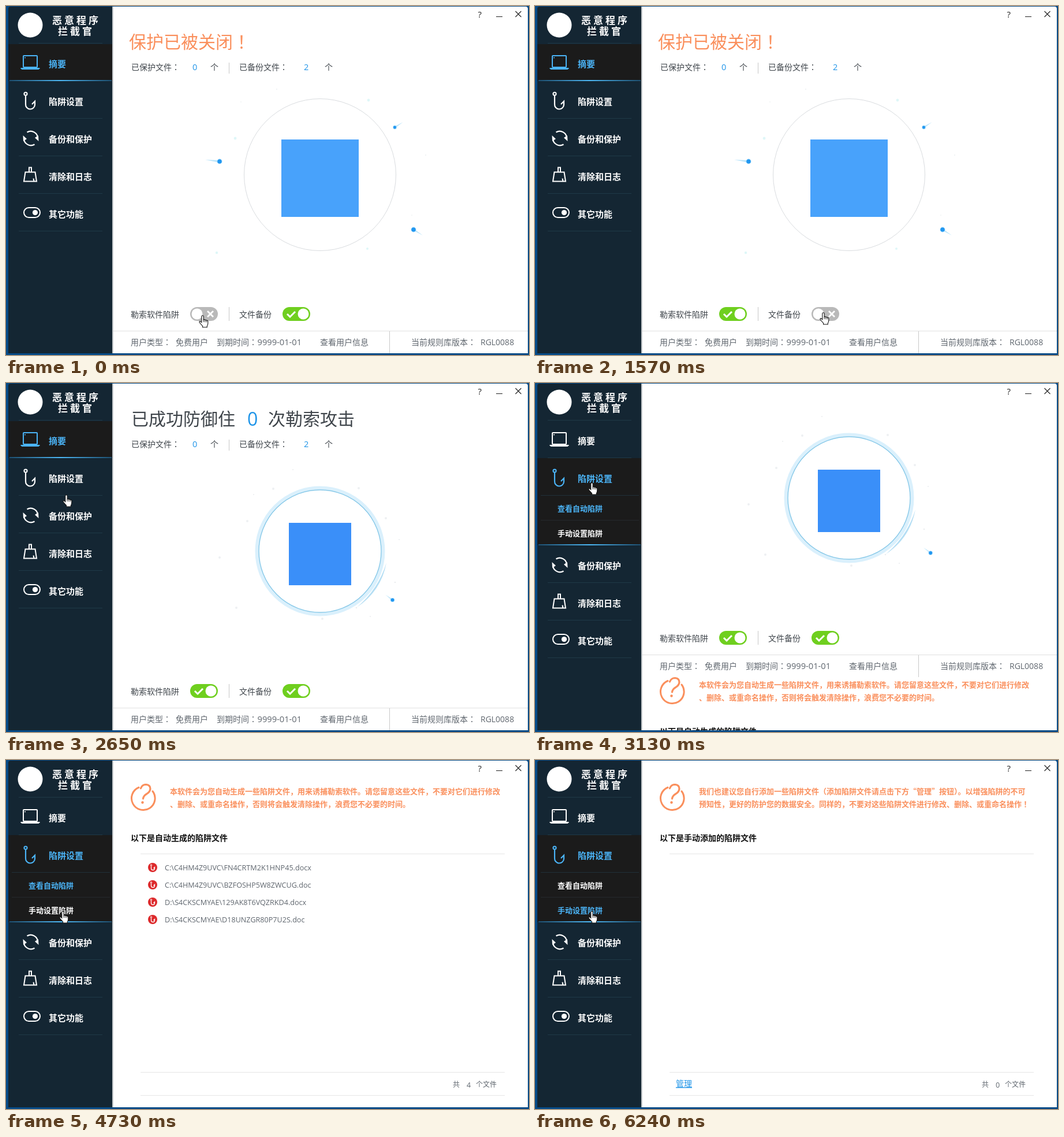
An HTML page that plays this animation: 906x604 px, repeating every 8000 ms.

```html
<!DOCTYPE html>
<html lang="zh-CN">
<head>
<meta charset="utf-8">
<style>
html, body { margin: 0; width: 100%; height: 100%; overflow: hidden; background: #064a86; }
svg { display: block; width: 906px; height: 604px; }
text { font-family: "Noto Sans CJK SC", "Noto Sans CJK", "Open Sans", sans-serif; white-space: pre; }
.mid { font-family: "Noto Sans CJK TC", "Noto Sans CJK", sans-serif; }
.lat { font-family: "Open Sans", "Noto Sans", sans-serif; }
.b { font-weight: 700; }
.thin { font-weight: 300; }
</style>
</head>
<body>
<svg id="stage" viewBox="0 0 906 604" lang="zh-CN"></svg>
<script>
const LOOP = 8000;
const BLUE = '#1e94e8', SKY = '#4bb4f7', ORANGE = '#fa8f5c', DARK = '#3f454b', GREY = '#5f666e';

// Colons and exclamation marks sit in the middle of their square
const centred = str => str.replace(/[：！]/g, '<tspan class="mid" lang="zh-TW">$&</tspan>');
// y is the middle of the glyphs
const text = (x, y, size, str, fill, attrs = '') =>
  `<text x="${x}" y="${(y + size * 0.37).toFixed(1)}" font-size="${size}" fill="${fill}" ${attrs}>${centred(String(str))}</text>`;
const rect = (x, y, w, h, fill, attrs = '') =>
  `<rect x="${x}" y="${y}" width="${w}" height="${h}" fill="${fill}" ${attrs}/>`;
const dot = (x, y, r, fill, attrs = '') => `<circle cx="${x}" cy="${y}" r="${r}" fill="${fill}" ${attrs}/>`;
const line = (d, stroke, width = 1, attrs = '') =>
  `<path d="${d}" fill="none" stroke="${stroke}" stroke-width="${width}" ${attrs}/>`;
const group = (id, body, attrs = '') => `<g id="${id}" ${attrs}>${body}</g>`;
const LAT = 'class="lat"', BOLD = 'class="b"', THIN = 'class="thin"';

// Menu icons, drawn around the middle line of their row
const icons = [
  c => rect(30, -14, 24, 20, 'none', `rx="1" stroke="${c}" stroke-width="2"`) +
    line('M25.5 8H58.5', c, 2) + line('M27 9.5H57', c, 1) + line('M32 -10.5h2', c, 1.5),
  c => dot(34, -13, 2.6, 'none', `stroke="${c}" stroke-width="2"`) +
    line('M34 -10V5a8 8 0 0 0 16 1V0l-5 5', c, 2.2),
  c => line('M36.5 -11.5A12.2 12.2 0 0 1 55 -1M49.5 9.5A12.2 12.2 0 0 1 31 -1', c, 2.2) +
    `<path d="M29.5 -6L36 0L30 4zM56.5 4L50 -2L56 -6z" fill="${c}"/>`,
  c => line('M40 -8V-15.5h4V-8M33.5 -7.5H50.5L53 8.5H31zM48.5 8.5l-1 -5', c, 2),
  c => rect(31, -11, 28, 17, 'none', `rx="8.5" stroke="${c}" stroke-width="2"`) + dot(50.5, -2.5, 4.6, c)
];
const labels = ['摘要', '陷阱设置', '备份和保护', '清除和日志', '其它功能'];

function menu(open) {
  const sel = open ? 1 : 0;
  let out = open ? rect(4, 130, 180, 150, '#1b1b1b') : rect(4, 66, 180, 63, '#1b1b1b');
  out += rect(22, 64, 145, 1, '#1f3947');
  if (open) {
    out += rect(22, 129, 145, 1, '#1f3947') +
      rect(10, 194, 170, 1, '#203039') + rect(10, 237, 170, 1, '#25292c') +
      text(39, 217, 13, '查看自动陷阱', '#fff', BOLD + ' id="sub0"') +
      text(39, 260, 13, '手动设置陷阱', '#fff', BOLD + ' id="sub1"');
  }
  out += rect(6, open ? 279 : 128, 177, 2, 'url(#glow)');
  labels.forEach((label, i) => {
    const y = 100 + 65 * i + (open && i > 1 ? 86 : 0);
    const c = i === sel ? SKY : '#fff';
    out += `<g transform="translate(0 ${y})">${icons[i](c)}</g>` + text(74, y, 15, label, c, BOLD);
    if (i > sel) out += rect(22, y + 29, 145, 1, '#1f3947');
  });
  return out;
}

function toggle(id, x) {
  const on = rect(x, 521, 48, 24, '#6fcf1f', 'rx="12"') + dot(x + 36, 533, 9.5, '#fff') +
    line(`M${x + 8} 533l5 5l9 -9`, '#fff', 3);
  const off = rect(x, 521, 48, 24, '#b9b9b9', 'rx="12"') + dot(x + 12, 533, 9.5, '#fff') +
    line(`M${x + 30} 528l10 10m0 -10l-10 10`, '#fff', 2.8);
  return group(id + 'On', on) + group(id + 'Off', off);
}

const specks = (list, fill) => list.map(([x, y, r]) => dot(x, y, r || 2, fill)).join('');

function comet(x, y, r, dx, dy) {
  return `<path d="M${x + dx} ${y + dy}L${x - dy / 12} ${y + dx / 12}L${x + dy / 12} ${y - dx / 12}z" fill="#a5dcf8" opacity=".75"/>` +
    dot(x, y, r + 0.8, '#8fd2fa') + dot(x, y, r, '#2196f0');
}

const offArt =
  specks([[628, 163, 2.4], [397, 229, 2.4], [365, 427, 2.2], [626, 420, 2]], '#dff7f8') +
  specks([[727, 258, 1.2], [703, 362, 1], [469, 144, 1.2], [407, 166, 1]], '#f0f4f5') +
  dot(544, 292, 131.5, 'none', 'stroke="#d9dcdf"') +
  comet(370, 269, 3.6, -25, -3) + comet(673.5, 210, 2.4, 14, -9) + comet(706, 387, 3.6, 16, 10) +
  rect(477, 231, 134, 134, '#48a2fb');

const onArt =
  specks([[463, 183], [611, 182], [418, 239], [658, 234], [370, 302], [399, 389], [548, 408]], '#eef0f2') +
  specks([[497, 150, 1], [429, 193, 1], [681, 271, 1], [674, 345, 1.3], [631, 404, 1], [607, 389, 1.3]], '#eaedef') +
  dot(544, 291, 109.5, 'none', 'stroke="#daf0fc" stroke-width="6"') +
  dot(544, 291, 106, 'none', 'stroke="#86c8e8" stroke-width="1.4"') +
  '<path d="M659 311Q650 360 608 388Q645 357 659 311z" fill="#b4def4"/>' +
  group('spark', comet(0, 0, 2.8, -12, -9)) +
  rect(490, 242, 108, 108, '#3a8ff9');

const home =
  group('titleOff', text(213, 62, 30, '保护已被关闭！', ORANGE, THIN)) +
  group('titleOn', text(217, 62, 30, '已成功防御住', DARK, THIN) + text(418, 62, 32, '0', BLUE, LAT) +
    text(454, 62, 30, '次勒索攻击', DARK, THIN)) +
  text(217, 106, 14, '已保护文件：', DARK) + text(323, 106, 14.5, '0', BLUE, LAT) + text(354, 106, 14, '个', DARK) +
  rect(386, 98, 1, 19, '#c8c8c8') +
  text(404, 106, 14, '已备份文件：', DARK) + text(516, 106, 14.5, '2', BLUE, LAT) + text(552, 106, 14, '个', DARK) +
  group('artOff', offArt) + group('artOn', onArt) +
  text(216, 534, 14, '勒索软件陷阱', DARK) + toggle('trap', 319) +
  rect(386, 521, 1, 24, '#c8c8c8') +
  text(404, 534, 14, '文件备份', DARK) + toggle('backup', 479) +
  rect(186, 562, 718, 1, '#e0e0e0') + rect(664, 563, 1, 38, '#c8c8c8') +
  text(216, 582, 14, '用户类型：', GREY) + text(294, 582, 14, '免费用户', GREY) +
  text(365, 582, 14, '到期时间：', GREY) + text(435.5, 582, 14.7, '9999-01-01', GREY, LAT) +
  text(544, 582, 14, '查看用户信息', GREY) +
  text(702, 582, 14, '当前规则库版本：', GREY) + text(822, 582, 14, 'RGL0088', GREY, LAT);

function listPage(tips, heading, files, extra = '') {
  const mark = line('M230 47.5A20.3 20.3 0 1 0 254 54', ORANGE, 3, 'stroke-linecap="round"') +
    line('M233.5 49Q236 42.5 242.5 42.5Q250 43 250 50Q249.5 55 244 58.5Q238 62 237.5 67', ORANGE, 3.2, 'stroke-linecap="round"') +
    dot(236.5, 73.5, 2.2, ORANGE);
  const rows = files.map((name, i) => {
    const y = 186 + 30 * i;
    return dot(254, y, 8, '#dd2a2c') + dot(251.5, y - 4, 1.2, 'none', 'stroke="#fff"') +
      line(`M251.5 ${y - 2.5}v4a3 3 0 0 0 6 0v-2l-2 2`, '#fff', 1.3) + text(275, y, 12.6, name, GREY, LAT);
  }).join('');
  return mark + tips.map((tip, i) => text(284, 54 + 22 * i, 13, tip, ORANGE, BOLD)).join('') +
    text(216, 135, 14, heading, '#111', BOLD) +
    [162, 540, 580].map(y => rect(233, y, 631, 1, '#e6e6e6')).join('') + rows + extra +
    text(774, 562, 12, '共', GREY) + text(798, 562, 12.5, files.length, GREY, LAT) + text(814, 562, 12, '个文件', GREY);
}

const autoPage = listPage(
  ['本软件会为您自动生成一些陷阱文件，用来诱捕勒索软件。请您留意这些文件，不要对它们进行修改',
   '、删除、或重命名操作，否则将会触发清除操作，浪费您不必要的时间。'],
  '以下是自动生成的陷阱文件',
  ['C:\\C4HM4Z9UVC\\FN4CRTM2K1HNP45.docx', 'C:\\C4HM4Z9UVC\\BZFOSHP5W8ZWCUG.doc',
   'D:\\S4CKSCMYAE\\129AK8T6VQZRKD4.docx', 'D:\\S4CKSCMYAE\\D18UNZGR80P7U2S.doc']);
const manualPage = listPage(
  ['我们也建议您自行添加一些陷阱文件（添加陷阱文件请点击下方“管理”按钮）。以增强陷阱的不可',
   '预知性，更好的防护您的数据安全。同样的，不要对这些陷阱文件进行修改、删除、或重命名操作！'],
  '以下是手动添加的陷阱文件', [],
  text(244, 560, 14, '管理', BLUE, 'font-weight="500" text-decoration="underline"'));

const hand = `<path d="M6.5 .8Q8.2 .8 8.2 2.6V8Q9.6 7.2 10.8 8.4Q12.4 7.8 13.3 9.2Q15.6 8.8 15.8 11V14.5Q15.6 17 14.3 19V21H6.6V19L1.4 13Q.2 10.6 2.4 10.5L4.8 12.6V2.6Q4.8 .8 6.5 .8z"
  fill="#fff" stroke="#111" stroke-width="1.1"/>` + line('M8.2 8v4M10.8 8.6v3.6M13.3 9.4v3', '#111', 0.9);

const stage = document.getElementById('stage');
stage.innerHTML =
  `<defs>
    <linearGradient id="glow"><stop offset="0" stop-color="#1d4f70"/><stop offset=".5" stop-color="#4db8f5"/><stop offset="1" stop-color="#1d4f70"/></linearGradient>
    <clipPath id="body"><rect x="186" y="41" width="718" height="560"/></clipPath>
  </defs>` +
  rect(0, 0, 906, 604, '#064a86') + '<path d="M184 1H900Q904 1 904 5V601H184z" fill="#fff"/>' +
  '<path d="M8 1H184V601H4V5Q4 1 8 1z" fill="#142633"/>' + rect(184, 1, 2, 600, '#c4c8cb') +
  dot(42, 33, 21.5, '#fff') +
  text(80, 25, 17, '恶意程序', '#fff', BOLD + ' letter-spacing="4"') +
  text(90, 44, 17, '拦截官', '#fff', BOLD + ' letter-spacing="4"') +
  group('menuShut', menu(false)) + group('menuOpen', menu(true)) +
  text(817.5, 14, 15, '?', '#222', LAT) + rect(849, 18, 11, 1, '#222') +
  line('M882.5 9l10 10m0 -10l-10 10', '#222', 1.1) +
  `<g clip-path="url(#body)">${group('page0', home)}${group('page1', autoPage)}${group('page2', manualPage)}</g>` +
  group('cursor', hand);

// The screen refreshes at these moments only
const ticks = [0, 120, 240, ...Array.from({ length: 25 }, (_, i) => 610 + 120 * i), 4240, 4360, 4730, 5980, 6100, 6240];
const pointer = [[0, 334, 535], [240, 342, 536], [730, 342, 536], [1210, 493, 530], [2170, 493, 530], [2650, 98, 193],
  [3010, 92, 172], [3490, 92, 172], [4240, 92, 212], [4360, 92, 250], [4730, 92, 261]];
const scroll = [[3010, 0], [3130, 92], [3490, 560], [4730, 560], [5980, 750], [6100, 950], [6240, 1120]];
const TRAP_ON = 610, BACKUP_OFF = 1450, BACKUP_ON = 2050, OPEN = 3130, MANUAL = 5980;

function at(keys, t, k = 1) {
  const i = keys.findIndex(key => key[0] > t);
  if (i === 0) return keys[0][k];
  if (i < 0) return keys[keys.length - 1][k];
  const a = keys[i - 1], b = keys[i];
  return a[k] + (b[k] - a[k]) * (t - a[0]) / (b[0] - a[0]);
}

const el = id => document.getElementById(id);
const show = (id, on) => el(id).setAttribute('display', on ? 'inline' : 'none');
const move = (id, x, y) => el(id).setAttribute('transform', `translate(${x.toFixed(1)} ${y.toFixed(1)})`);
const flip = (id, on) => { show(id + 'On', on); show(id + 'Off', !on); };

function draw(time) {
  const t = ticks.filter(tick => tick <= time).pop();
  const trap = t >= TRAP_ON, backup = t < BACKUP_OFF || t >= BACKUP_ON, safe = trap && backup;
  flip('trap', trap);
  flip('backup', backup);
  flip('title', safe);
  flip('art', safe);

  const age = Math.min(t - (t < BACKUP_OFF ? TRAP_ON : BACKUP_ON), 1440);
  const dist = 127.5 + 0.0395 * age;
  move('spark', 544 + dist * 0.83, 291 + dist * 0.559);

  const open = t >= OPEN, manual = t >= MANUAL;
  show('menuOpen', open);
  show('menuShut', !open);
  el('sub0').setAttribute('fill', manual ? '#fff' : SKY);
  el('sub1').setAttribute('fill', manual ? SKY : '#fff');

  const top = at(scroll, t);
  for (let i = 0; i < 3; i++) move('page' + i, 0, 560 * i - top);
  move('cursor', at(pointer, t, 1), at(pointer, t, 2));
}

const start = performance.now();
function tick() {
  draw((performance.now() - start) % LOOP);
  requestAnimationFrame(tick);
}
tick();
</script>
</body>
</html>
```
